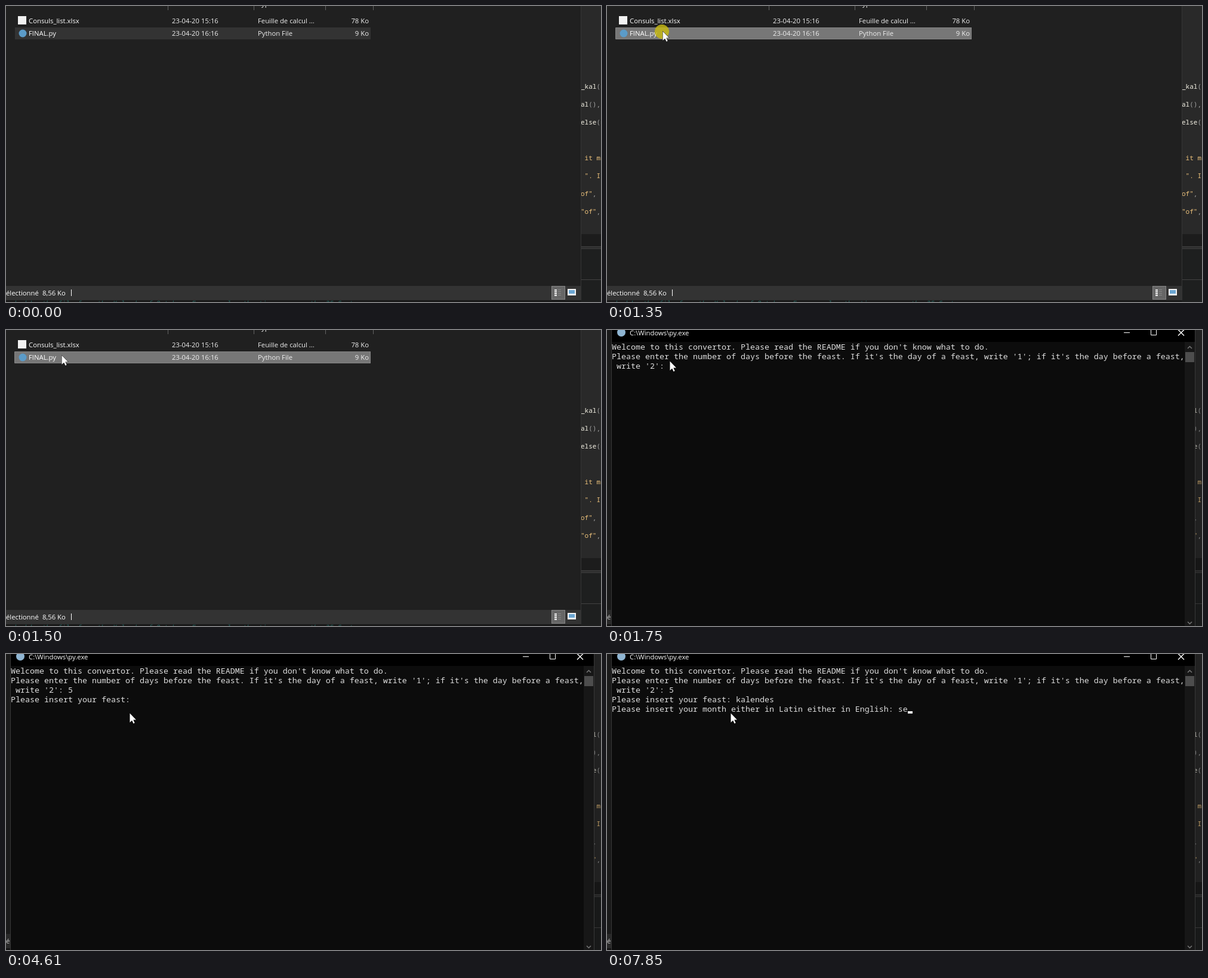
These frames come from a looping animation (997 px wide and 497 px high, 8 s). An HTML page with a canvas:

```html
<!DOCTYPE html>
<html lang="en">
<head>
<meta charset="utf-8">
<title>Date convertor demo</title>
<style>
  html, body { margin: 0; width: 100%; height: 100%; overflow: hidden; background: #202020; }
  canvas { display: block; }
</style>
</head>
<body>
<canvas id="stage" width="997" height="497"></canvas>
<script>
const ctx = document.getElementById('stage').getContext('2d');
const LOOP = 8000;
const CONSOLE_OPEN = 1580;
const UI = '11.3px "Open Sans", "Noto Sans", sans-serif';
const CODE = '11px "Noto Sans Mono", "DejaVu Sans Mono", monospace';
const TERMINAL = '13.333px "Noto Sans Mono", "DejaVu Sans Mono", monospace';

function rect(x, y, w, h, color) {
  ctx.fillStyle = color;
  ctx.fillRect(x, y, w, h);
}

function text(str, x, y, color = '#fff', font = UI, align = 'left') {
  ctx.font = font;
  ctx.textAlign = align;
  ctx.fillStyle = color;
  ctx.fillText(str, x, y);
}

function stroke(path, color, width = 1) {
  ctx.strokeStyle = color;
  ctx.lineWidth = width;
  ctx.stroke(new Path2D(path));
}

function disc(x, y, r, color) {
  ctx.beginPath();
  ctx.arc(x, y, r, 0, 7);
  ctx.fillStyle = color;
  ctx.fill();
}

// Code lines 30px apart; the last four are parts of string literals.
const codeLines = ['_kal(', 'al(),', 'else(', '', ' it m', ' ". I', 'of",', '"of",'];

function drawEditor() {
  rect(0, 0, 997, 497, '#292929');
  rect(963, 383, 34, 20, '#1c1c1c');
  rect(963, 408, 34, 89, '#1e1f1f');
  for (const y of [404, 407, 459]) rect(963, y, 34, 1, '#434343');
  codeLines.forEach((line, row) => [...line].forEach((char, col) => {
    const color = /[(),]/.test(char) ? '#a2a2a2' : row > 3 ? '#edc27b' : '#f6f3e6';
    text(char, 963 + 6.6 * col, 139 + 30 * row, color, CODE);
  }));
  rect(0, 494, 963, 3, '#191919');
  text('sched by the file from the Kalends of October. For example, the time goes on the 25 Sept',
    0, 503, '#266460', 'italic ' + CODE);
}

const files = [
  ['Consuls_list.xlsx', '23-04-20 15:16', 'Feuille de calcul ...', '78 Ko'],
  ['FINAL.py', '23-04-20 16:16', 'Python File', '9 Ko']
];

function drawExplorer(hovered) {
  rect(0, 0, 963, 470, '#202020');
  rect(963, 0, 1, 494, '#353535');
  for (const x of [271, 415, 535, 615]) rect(x, 0, 1, 7, '#636363');
  text('Type', 422, 0);

  rect(15, 36, 596, 20, hovered ? '#777' : '#333');
  if (hovered) stroke('M14.5 36.5h596v19h-596z', '#858585');
  rect(20, 17, 14, 14, '#f2f2f2');
  disc(28, 46, 6.5, '#5b9bc8');
  files.forEach(([name, date, type, size], row) => {
    const y = 29 + 21 * row;
    text(name, 38, y);
    text(date, 278, y, '#eee');
    text(type, 422, y, '#eee');
    text(size, 608, y, '#eee', UI, 'right');
  });

  rect(0, 470, 963, 24, '#333');
  text('électionné', 0, 486);
  text('8,56 Ko', 61, 486);
  rect(109, 476, 1, 11, '#fff');
  rect(914, 470, 23, 23, '#858585');
  rect(915, 471, 21, 21, '#666');
  for (let y = 476; y < 488; y += 3) {
    rect(919, y, 4, 2, '#f2f2f2');
    rect(925, y, 5, 1, '#888');
  }
  rect(941, 475, 14, 11, '#f4f4f4');
  rect(943, 477, 10, 6, '#6ba6d3');
}

const intro = [
  'Welcome to this convertor. Please read the README if you don\'t know what to do.',
  'Please enter the number of days before the feast. If it\'s the day of a feast, write \'1\'; if it\'s the day before a feast,'
];
// Each question appears at `shown`; its answer is typed from `typed` on.
const questions = [
  { shown: 0, typed: 3500, prompt: ' write \'2\': ', answer: '5' },
  { shown: 4060, typed: 5240, prompt: 'Please insert your feast: ', answer: 'kalendes' },
  { shown: 6260, typed: 7730, prompt: 'Please insert your month either in Latin either in English: ', answer: 'se' }
];
const KEY_INTERVAL = 113;
const BLINK = 525;
const CARET_HOLD = 160;

function drawTerminal(t) {
  const lines = [...intro];
  let lastInput = 0;
  for (const { shown, typed, prompt, answer } of questions) {
    if (t < shown) break;
    const keys = Math.floor((t - typed) / KEY_INTERVAL) + 1;
    const count = Math.max(0, Math.min(answer.length, keys));
    lines.push(prompt + answer.slice(0, count));
    lastInput = count ? typed + (count - 1) * KEY_INTERVAL : shown;
  }
  lines.forEach((line, row) => text(line, 8, 33 + 16 * row, '#dedede', TERMINAL));

  const blinkOn = Math.floor((t - 2505) / BLINK) % 2 !== 0;
  const row = lines.length - 1;
  if (blinkOn || t - lastInput < CARET_HOLD)
    rect(8 + 8 * lines[row].length, 32 + 16 * row, 8, 4, '#f2f2f2');
}

function drawConsole(t) {
  rect(0, 0, 8, 497, 'rgba(0,0,0,.2)');
  rect(985, 0, 12, 497, 'rgba(0,0,0,.2)');
  rect(7, 0, 979, 497, '#383838');
  rect(8, 0, 977, 20, '#000');
  rect(8, 20, 960, 477, '#0c0c0c');

  disc(24, 4, 7, '#8fb5d2');
  text('C:\\Windows\\py.exe', 38, 9);
  rect(866, 4, 10, 1, '#fff');
  stroke('M911.5 -.5h9v9h-9z', '#fff');
  stroke('M957 -.5l10 10m0 -10l-10 10', '#fff', 1.4);

  rect(968, 20, 17, 477, '#171717');
  rect(969, 37, 15, 17, '#4d4d4d');
  stroke('M973 31l3.5 -3.5l3.5 3.5M973 490l3.5 3.5l3.5 -3.5', '#777', 1.5);
  drawTerminal(t);
}

// Pointer key points: time, x, y.
const path = [
  [70, 863, 484], [860, 86, 44], [930, 93, 42], [CONSOLE_OPEN, 93, 42],
  [1910, 116, 61], [2120, 116, 61], [2510, 207, 99]
];

function pointerAt(t) {
  const next = path.findIndex(point => point[0] > t);
  if (next < 0) return path.at(-1).slice(1);
  const [t0, x0, y0] = path[next - 1], [t1, x1, y1] = path[next];
  const p = (t - t0) / (t1 - t0);
  const eased = p * p * (3 - 2 * p);
  return [Math.round(x0 + (x1 - x0) * eased), Math.round(y0 + (y1 - y0) * eased)];
}

const arrow = new Path2D('M.5 .5v15.5l3.6 -3.5l2.4 5.3l2.2 -1l-2.4 -5.3h4.7z');

function drawPointer(x, y) {
  ctx.save();
  ctx.translate(x, y);
  ctx.lineWidth = 1;
  ctx.lineJoin = 'round';
  ctx.strokeStyle = '#000';
  ctx.stroke(arrow);
  ctx.fillStyle = '#fff';
  ctx.fill(arrow);
  ctx.restore();
}

function render(t) {
  const between = (a, b) => t >= a && t < b;
  const flash = between(1420, 1500);
  const pointer = t < 70 ? null : flash ? [116, 61] : pointerAt(t);
  const hovered = pointer && pointer[0] < 611 && pointer[1] < 56;

  drawEditor();
  drawExplorer(hovered);
  if (flash || t >= CONSOLE_OPEN) drawConsole(t);
  if (between(1180, 1260) || between(1340, 1420)) disc(92, 43, 12, 'rgba(200,187,20,.82)');
  if (pointer) drawPointer(...pointer);
}

function frame(now) {
  render(now % LOOP);
  requestAnimationFrame(frame);
}
requestAnimationFrame(frame);
</script>
</body>
</html>
```
